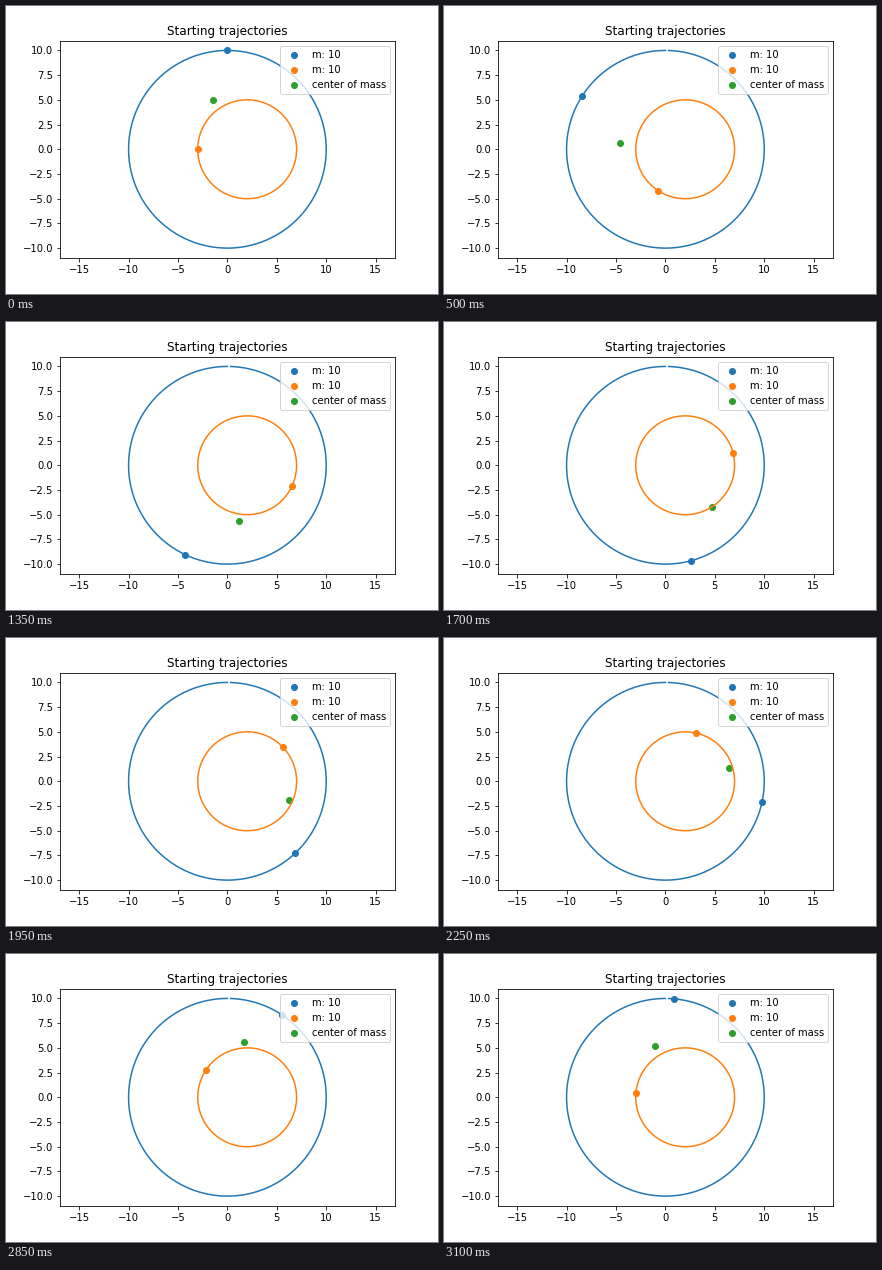
A matplotlib script for the animation above (3150 ms loop, 432x288 px).

```python
import numpy as np
import matplotlib.pyplot as plt
from matplotlib.animation import FuncAnimation

FRAMES = 63
INTERVAL = 50
STEP = 0.1  # radians per frame


def outer(t):
    return np.array([-10 * np.sin(t), 10 * np.cos(t)])


def inner(t):
    return np.array([2 - 5 * np.cos(t), -5 * np.sin(t)])


def positions(t):
    a, b = outer(t), inner(t)
    return a, b, (a + b) / 2  # equal masses


plt.rcParams["font.family"] = "DejaVu Sans"
fig, ax = plt.subplots(figsize=(6, 4), dpi=72)
fig.subplots_adjust(left=0.125, right=0.9, bottom=0.125, top=0.88)

# The sampled orbit stops just short of a full turn, leaving a small gap.
angles = np.arange(0, 2 * np.pi, 0.05)
for path in (outer, inner):
    ax.plot(*path(angles))

labels = ("m: 10", "m: 10", "center of mass")
dots = [
    ax.scatter(*p, color=f"C{i}", label=label)
    for i, (p, label) in enumerate(zip(positions(0), labels))
]

ax.set_title("Starting trajectories")
ax.axis("equal")
ax.set_xticks(np.arange(-15, 16, 5))
ax.set_yticks(np.arange(-10, 10.1, 2.5))
ax.legend(loc="upper right")


def update(frame):
    for dot, p in zip(dots, positions(frame * STEP)):
        dot.set_offsets([p])
    return dots


anim = FuncAnimation(fig, update, frames=FRAMES, interval=INTERVAL,
                     repeat=True, repeat_delay=0)
plt.show()
```
